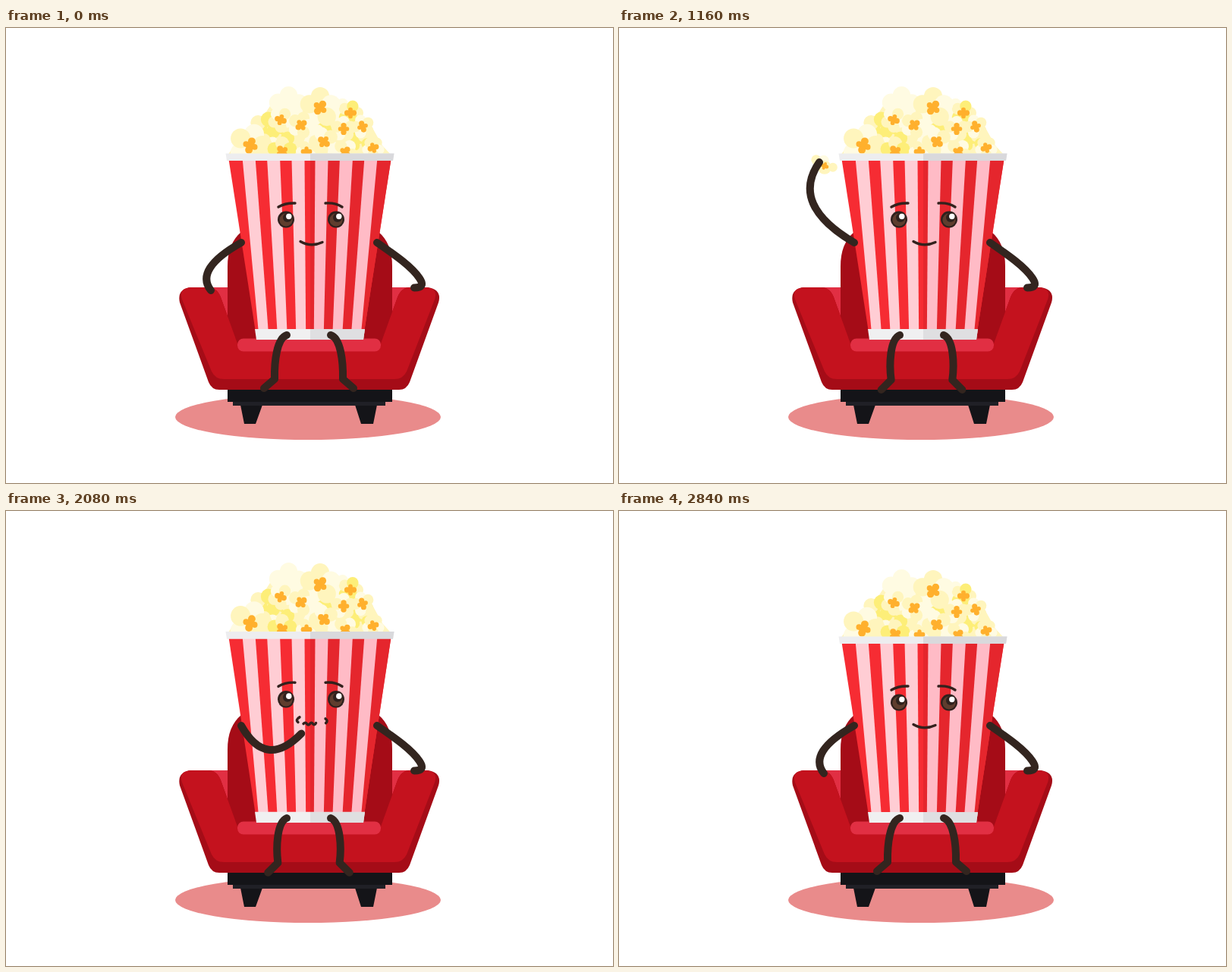
These frames come from a looping animation (800x600 px, 2880 ms). An HTML page:

```html
<!DOCTYPE html>
<html lang="en">
<head>
<meta charset="utf-8">
<title>Popcorn snack</title>
<style>
html, body { margin: 0; width: 100%; height: 100%; overflow: hidden; background: #fff; }
svg { display: block; width: 100vw; height: 100vh; }
.limb { fill: none; stroke: #33251f; stroke-width: 10; stroke-linecap: round; stroke-linejoin: round; }
.line { fill: none; stroke: #33211d; stroke-width: 3.4; stroke-linecap: round; stroke-linejoin: round; }
</style>
</head>
<body>
<svg viewBox="0 0 800 600">
  <clipPath id="cup0"><path d="M293.5 173H507.5L472.5 398H328.5Z"/></clipPath>
  <clipPath id="cup1"><path d="M401 173H507.5L472.5 398H401Z"/></clipPath>
  <ellipse cx="398" cy="513" rx="175" ry="30" fill="#e98b8b"/>
  <g id="chair">
    <path fill="#141418" d="M292 475H509V493H292Z M309 497H338L329 522H314Z M460 497H489L484 522H468Z"/>
    <path fill="#202026" d="M299 493H500V498H299Z"/>
    <path fill="#e12f43" d="M262 342H537L500 420H300Z"/>
    <path fill="#a50c17" d="M292 420V314Q292 284 310 269H491Q509 284 509 314V420Z"/>
    <path fill="#a50c17" d="M244 342H266Q278 342 283 355L305 416H494L516 355Q521 342 533 342H556Q575 345 570 362L532 467Q528 477 518 477H281Q271 477 267 467L229 362Q225 344 244 342Z"/>
    <path fill="#c4121e" d="M244 342H266Q278 342 283 355L305 416H494L516 355Q521 342 533 342H553Q570 343 565 358L528 453Q523 463 512 463H287Q276 463 271 453L232 358Q227 343 244 342Z"/>
    <rect x="305" y="409.5" width="189" height="17" rx="8" fill="#e12f43"/>
  </g>
  <g id="body">
    <g id="popcorn"></g>
    <g id="bucket"></g>
    <g id="eyes"></g>
    <path class="line" d="M359 236Q368 230.5 381 231M421 231Q434 230 443 236"/>
    <path class="line" id="mouth"/>
  </g>
  <path class="limb" d="M489 283C515 301 535 315 545 330C551 339 548 342.5 538 342.5"/>
  <path class="limb" id="legL"/>
  <path class="limb" id="legR"/>
  <g id="piece"></g>
  <path class="limb" id="arm"/>
</svg>
<script>
const LOOP = 2880, STEP = 40;
const $ = id => document.getElementById(id);

function add(parent, tag, attrs) {
  const el = document.createElementNS('http://www.w3.org/2000/svg', tag);
  for (const k in attrs) el.setAttribute(k, attrs[k]);
  return parent.appendChild(el);
}
const dot = (parent, cx, cy, r, fill) => add(parent, 'circle', { cx, cy, r, fill });
const shape = (parent, d, fill) => add(parent, 'path', { d, fill });

// Calls draw(x, y, index) for points spread evenly on a circle.
function ring(x, y, radius, count, turn, draw) {
  for (let i = 0; i < count; i++) {
    const a = turn + i * 2 * Math.PI / count;
    draw(x + radius * Math.cos(a), y + radius * Math.sin(a), i);
  }
}

const PALE = '#fff5bd', CREAM = '#fffbe2', YELLOW = '#fdee78';

function kernel(g, x, y, size, turn) {
  dot(g, x, y, size * .55, '#ffb02d');
  ring(x, y, size * .56, 4, turn, (px, py, i) => dot(g, px, py, size * (i % 2 ? .36 : .46), '#ffb02d'));
}

function puff(g, x, y, r, tone, turn, seeded) {
  const light = tone === YELLOW ? PALE : CREAM;
  dot(g, x, y, r * .75, tone);
  ring(x, y, r * .55, 5, turn, (px, py, i) => dot(g, px, py, r * .45, i % 3 ? tone : light));
  if (seeded) kernel(g, x, y, 4 + r * .23, turn);
}

function buildPopcorn(g) {
  shape(g, 'M292 168L308 145L330 130L350 100L400 90L436 92L462 112L482 130L496 155L508 168Z', PALE);
  // Back to front: x, y, radius
  const plain = [[342, 132, 22, YELLOW], [363, 138, 20, YELLOW], [412, 132, 18, YELLOW], [372, 103, 26, CREAM],
    [437, 107, 17, CREAM], [408, 145, 18, CREAM], [343, 157, 18, PALE], [467, 151, 16, YELLOW]];
  const seeded = [[454, 112, 17, YELLOW], [414, 105, 27, PALE], [470, 130, 16, PALE], [362, 121, 17, PALE],
    [389, 128, 18, PALE], [445, 133, 17, PALE], [419, 150, 20, PALE], [484, 158, 15, PALE],
    [322, 155, 29, PALE], [364, 163, 20, YELLOW], [396, 163, 14, PALE], [447, 164, 18, PALE]];
  plain.forEach((p, i) => puff(g, ...p, i * 2, false));
  seeded.forEach((p, i) => puff(g, ...p, i * 2.2, true));
}

function buildBucket(g) {
  const mid = 400.5, taper = .765;
  const tones = [['#f62c33', '#ffcdd4', '#f0f0f1', '#ededef'], ['#e5262d', '#ffbbc6', '#dfdfe1', '#d9d9dc']];
  tones.forEach(([red, pink, base, rim], half) => {
    const cup = add(g, 'g', { 'clip-path': `url(#cup${half})` });
    shape(cup, 'M280 170H520V400H280Z', red);
    for (const side of [-1, 1]) for (let n = 0; n < 3; n++) {
      const near = side * (7 + 32.4 * n), far = near + side * 17;
      shape(cup, `M${mid + near} 173H${mid + far}L${mid + far * taper} 398H${mid + near * taper}Z`, pink);
    }
    shape(g, `M${half ? 401 : 328} 397H473L471 411H${half ? 401 : 330}Z`, base);
    shape(g, `M${half ? 401 : 289.5} 165.5H511.5L510 175H${half ? 401 : 291}Z`, rim);
  });
}

function buildEyes(g) {
  for (const x of [369, 435]) {
    dot(g, x, 252.5, 11, '#2f211d');
    dot(g, x, 253, 8.5, '#5f3d2e');
    dot(g, x + 2, 250, 6, '#2f211d');
    dot(g, x + 3.8, 248.5, 3.7, '#fff');
  }
}

function buildPiece(g) {
  dot(g, -4, -5, 6.5, PALE);
  dot(g, 6, -4, 7, CREAM);
  dot(g, 7, 5, 9, PALE);
  dot(g, 18, 5, 6, PALE);
  kernel(g, 7, 3, 5.5, .4);
}

// Smooth track through rows of [time, values]; flat at turning points and holds.
function track(rows, t) {
  let i = 0;
  while (i < rows.length - 2 && t >= rows[i + 1][0]) i++;
  const [t0, from] = rows[i], [t1, to] = rows[i + 1];
  const span = t1 - t0, u = (t - t0) / span, w = 1 - u;
  const slope = (n, k) => {
    const p = rows[n - 1], q = rows[n], r = rows[n + 1];
    if (!p || !r || (q[1][k] - p[1][k]) * (r[1][k] - q[1][k]) <= 0) return 0;
    return (r[1][k] - p[1][k]) / (r[0] - p[0]);
  };
  return from.map((v, k) => v * (1 + 2 * u) * w * w + to[k] * u * u * (3 - 2 * u)
    + span * (slope(i, k) * u * w * w - slope(i + 1, k) * u * u * w));
}
const ramp = (t, a, b) => Math.min(1, Math.max(0, (t - a) / (b - a)));

// Left arm poses: bend point, then hand.
const pose = {
  rest: [248, 318, 270, 346],
  out: [224, 265, 240, 212],
  grab: [246, 188, 303, 141],
  pull: [225, 233, 264, 177],
  sweep: [214, 252, 244, 203],
  front: [262, 291, 293, 218],
  mouth: [348, 326, 388, 268],
  hold: [339, 351, 390, 310]
};
const armKeys = [
  [0, pose.rest], [120, pose.rest], [420, pose.out], [720, pose.grab], [800, pose.grab],
  [1160, pose.pull], [1260, pose.sweep], [1440, pose.front], [1840, pose.mouth], [1920, pose.mouth],
  [2200, pose.hold], [2340, pose.hold], [2780, pose.rest], [LOOP, pose.rest]
];
const PICK = 640, GRAB = 720, BITE = 1840, EATEN = 1960;
const CHEW = { start: 1920, beat: 320, end: 2560 };
const SWING = 930;

function mouthPath(t, chew) {
  if (t >= EATEN && t < CHEW.end) {
    const h = 1.5 + chew;
    return `M392 284q2.5 ${-h} 4.5 0q2 ${h} 4 0q2 ${-h} 4 0q2 ${h} 4 -1`
      + 'M387 275.5Q381 279 385 282M421 277.5Q425 280 421.5 283';
  }
  const smile = 1 - ramp(t, 1680, BITE) + ramp(t, CHEW.end, 2700);
  return `M388 ${283 - 1.5 * smile}Q402 ${283.5 + 6 * smile} 417 ${283.5 - smile}`;
}

function legPath(k, mirror) {
  const x = v => mirror ? 798 - v : v;
  return `M${x(370)} 405C${x(357)} ${409 + 3 * k} ${x(353.5 + 5 * k)} ${440 + 8 * k}`
    + ` ${x(354 + 9.5 * k)} ${463 + 2 * k}L${x(340 + 11.5 * k)} ${475 + 4 * k}`;
}

function draw(t) {
  const chewing = t >= CHEW.start && t < CHEW.end;
  const chew = chewing ? Math.sin(Math.PI * (t - CHEW.start) / CHEW.beat) ** 2 : 0;
  $('body').setAttribute('transform', `translate(0 410) scale(1 ${1 + .027 * chew}) translate(0 -410)`);
  $('mouth').setAttribute('d', mouthPath(t, chew));

  const arm = track(armKeys, t);
  $('arm').setAttribute('d', `M310 283Q${arm.join(' ')}`);

  const [hx, hy] = (t < GRAB ? pose.grab : arm).slice(2);
  const slip = 8 * ramp(t, GRAB, BITE);
  $('piece').setAttribute('transform', `translate(${hx + 3 - slip} ${hy + 5 - slip})`);
  $('piece').setAttribute('visibility', t >= PICK && t < EATEN ? 'visible' : 'hidden');

  const swing = (1 - Math.cos(2 * Math.PI * Math.min(t / SWING, 3))) / 2;
  $('legL').setAttribute('d', legPath(swing, false));
  $('legR').setAttribute('d', legPath(swing, true));
}

buildPopcorn($('popcorn'));
buildBucket($('bucket'));
buildEyes($('eyes'));
buildPiece($('piece'));

const start = performance.now();
function tick() {
  const t = (performance.now() - start) % LOOP;
  draw(Math.floor(t / STEP) * STEP);
  requestAnimationFrame(tick);
}
draw(0);
requestAnimationFrame(tick);
</script>
</body>
</html>
```
